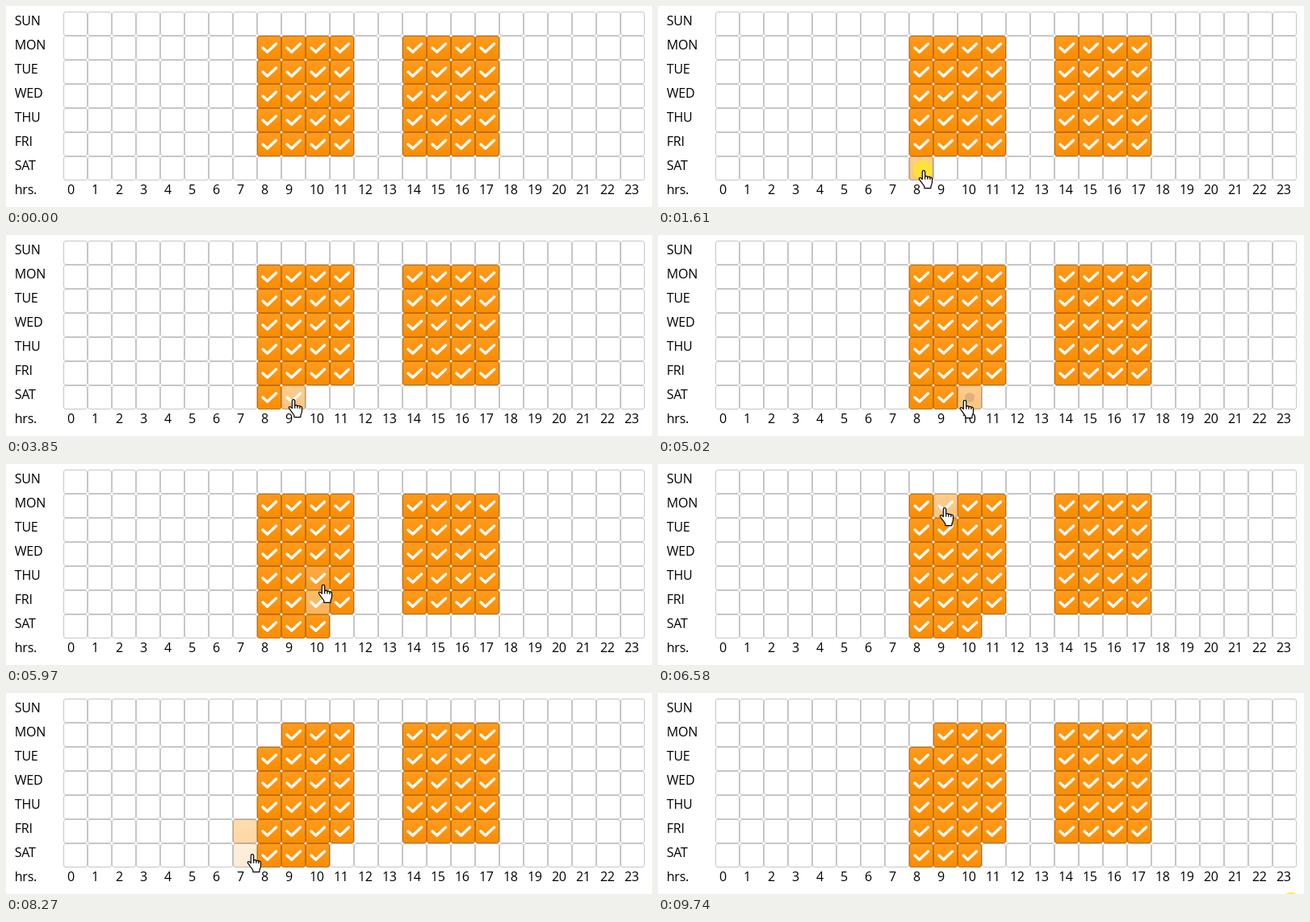
Recreate the animation shown at these times as an HTML page. Size 800 by 250 pixels, loop 9910 ms.

```html
<!DOCTYPE html>
<html lang="en">
<head>
<meta charset="utf-8">
<title>Weekly hours</title>
<style>
  html, body { margin: 0; width: 100%; height: 100%; overflow: hidden; background: #fff; }
  svg { display: block; width: 800px; height: 250px; }
  text { font: 16px "Open Sans", "Noto Sans", sans-serif; fill: #000; }
  .day { letter-spacing: -.25px; }
  .hour { letter-spacing: -.5px; }
  .box { fill: #fff; stroke: #c6c6c6; }
  .fill { fill: url(#orange); stroke: #c06f08; }
  .check { fill: none; stroke: #fff; stroke-width: 3.4; stroke-linecap: round; stroke-linejoin: round; }
  #press { fill: #ffe628; fill-opacity: .85; }
  #hand { fill: #fff; stroke: #000; stroke-width: 1.2; stroke-linejoin: round; }
</style>
</head>
<body>
<svg viewBox="0 0 800 250">
  <defs>
    <linearGradient id="orange" x2="0" y2="1">
      <stop offset="0" stop-color="#ff9b1f"/>
      <stop offset="1" stop-color="#f98c00"/>
    </linearGradient>
  </defs>
  <g id="grid"></g>
  <circle id="ripple"/>
  <circle id="press" r="12"/>
  <g id="hand">
    <path d="M-1.2 2a1.7 1.7 0 0 1 3.4 0v6c.6-1 3-.9 3.2.5.8-.9 2.8-.6 3 .7.8-.7 2.6-.3 2.6 1.4v4.4c0 2.5-1.6 3.6-1.6 5.5v1.8h-8v-1.6c0-1.4-2.2-3.3-3.6-5.6-.8-1.4-2.4-3-2.9-4.1-.5-1.3.9-2.2 2.2-1.4l1.7 1.6z"/>
    <path d="M2.2 8v3.5M5.4 8.5v3M8.4 9.2v2.6" fill="none"/>
  </g>
</svg>
<script>
const LOOP = 9910, SIZE = 30, LEFT = 71, TOP = 7, FADE = 110, RIPPLE = 270;
const DAYS = ['SUN', 'MON', 'TUE', 'WED', 'THU', 'FRI', 'SAT'];

// Pointer visits: [ms, x, y]
const visits = [
  [[510, 373, 232], [590, 352, 216], [670, 336, 208], [760, 328, 204],
   [2810, 328, 204], [2860, 332, 205], [2940, 351, 205], [3010, 355, 204],
   [4370, 355, 204], [4420, 362, 206], [4500, 377, 206], [4570, 379, 205],
   [5690, 379, 205], [5820, 387, 184], [5970, 392, 150], [6130, 386, 116],
   [6290, 372, 84], [6440, 358, 60], [6580, 354, 54], [6730, 354, 55],
   [6790, 352, 54], [6890, 335, 51], [6970, 330, 50],
   [7830, 330, 50], [7960, 324, 80], [8110, 313, 132], [8200, 306, 172], [8270, 304, 200], [8310, 304, 202]]
];

// Presses: shown at x, y from start to release; then the cell is toggled
const presses = [
  { start: 1610, end: 1770, x: 328, y: 204, row: 6, col: 8, on: true },
  { start: 3390, end: 3550, x: 355, y: 204, row: 6, col: 9, on: true },
  { start: 4870, end: 5020, x: 379, y: 205, row: 6, col: 10, on: true },
  { start: 7350, end: 7500, x: 330, y: 51, row: 1, col: 8, on: false },
  { start: 9740, end: 9910, x: 784, y: 260 }
];

const $ = id => document.getElementById(id);
const clamp = v => Math.max(0, Math.min(1, v));

function add(tag, attrs, text) {
  const el = document.createElementNS('http://www.w3.org/2000/svg', tag);
  for (const key in attrs) el.setAttribute(key, attrs[key]);
  if (text !== undefined) el.textContent = text;
  return $('grid').appendChild(el);
}

function makeCell(row, col) {
  const x = LEFT + col * SIZE, y = TOP + row * SIZE;
  const rect = { x: x + .5, y: y + .5, width: SIZE - 1, height: SIZE - 1, rx: 2.5 };
  add('rect', { class: 'box', ...rect });
  const fill = add('rect', { class: 'fill', ...rect });
  const check = add('path', { class: 'check', d: `M${x + 7} ${y + 15}l5.7 5.3 10.8-10.3` });
  const work = row > 0 && row < 6 && ((col > 7 && col < 12) || (col > 13 && col < 18));
  const press = presses.find(p => p.row === row && p.col === col);
  return { x, y, fill, check, work, press };
}

const cells = [];
DAYS.forEach((day, row) => {
  add('text', { class: 'day', x: 10.8, y: 24 + row * SIZE }, day);
  for (let col = 0; col < 24; col++) cells.push(makeCell(row, col));
});
add('text', { class: 'day', x: 10.8, y: 234 }, 'hrs.');
for (let h = 0; h < 24; h++) add('text', { class: 'hour', x: 76 + h * SIZE, y: 234 }, h);

function pointer(t) {
  for (const path of visits) {
    if (t < path[0][0] || t >= path[path.length - 1][0]) continue;
    const i = path.findIndex(k => k[0] > t);
    const [t0, x0, y0] = path[i - 1], [t1, x1, y1] = path[i];
    const p = (t - t0) / (t1 - t0);
    return { x: x0 + (x1 - x0) * p, y: y0 + (y1 - y0) * p };
  }
  return null;
}

const inside = (p, c) => p && p.x >= c.x && p.x < c.x + SIZE && p.y >= c.y && p.y < c.y + SIZE;

function render(t) {
  // Hover fades: share of the last FADE ms spent over each cell
  const trail = Array.from({ length: 16 }, (_, i) => pointer(t - FADE * i / 16));
  for (const c of cells) {
    const hover = trail.filter(p => inside(p, c)).length / trail.length;
    const swap = c.press ? clamp((t - c.press.end - 60) / 120) : 0;
    const tick = c.press ? (c.press.on ? swap : 1 - swap) : +c.work;
    const on = c.press && t > c.press.end + 100 ? c.press.on : c.work;
    c.fill.style.opacity = on ? 1 - hover / 2 : hover / 2;
    c.check.style.opacity = tick;
  }

  const held = presses.find(p => t >= p.start && t < p.end);
  $('press').style.display = held ? '' : 'none';
  if (held) $('press').setAttribute('transform', `translate(${held.x} ${held.y})`);

  const done = presses.find(p => p.row && t >= p.end && t < p.end + RIPPLE);
  const ripple = $('ripple');
  ripple.style.display = done ? '' : 'none';
  if (done) {
    const age = t - done.end;
    ripple.setAttribute('cx', LEFT + (done.col + .5) * SIZE);
    ripple.setAttribute('cy', TOP + (done.row + .5) * SIZE);
    ripple.setAttribute('r', Math.min(14, 6 + age / 16));
    ripple.setAttribute('fill', done.on ? '#78706c' : '#ff6a58');
    ripple.style.opacity = (done.on ? .25 : .6) * clamp((RIPPLE - age) / 170);
  }

  const p = trail[0];
  $('hand').style.display = p ? '' : 'none';
  if (p) $('hand').setAttribute('transform', `translate(${p.x + .5} ${p.y + .3})`);
}

const begin = performance.now();
function tick() {
  render((performance.now() - begin) % LOOP);
  requestAnimationFrame(tick);
}
tick();
</script>
</body>
</html>
```
